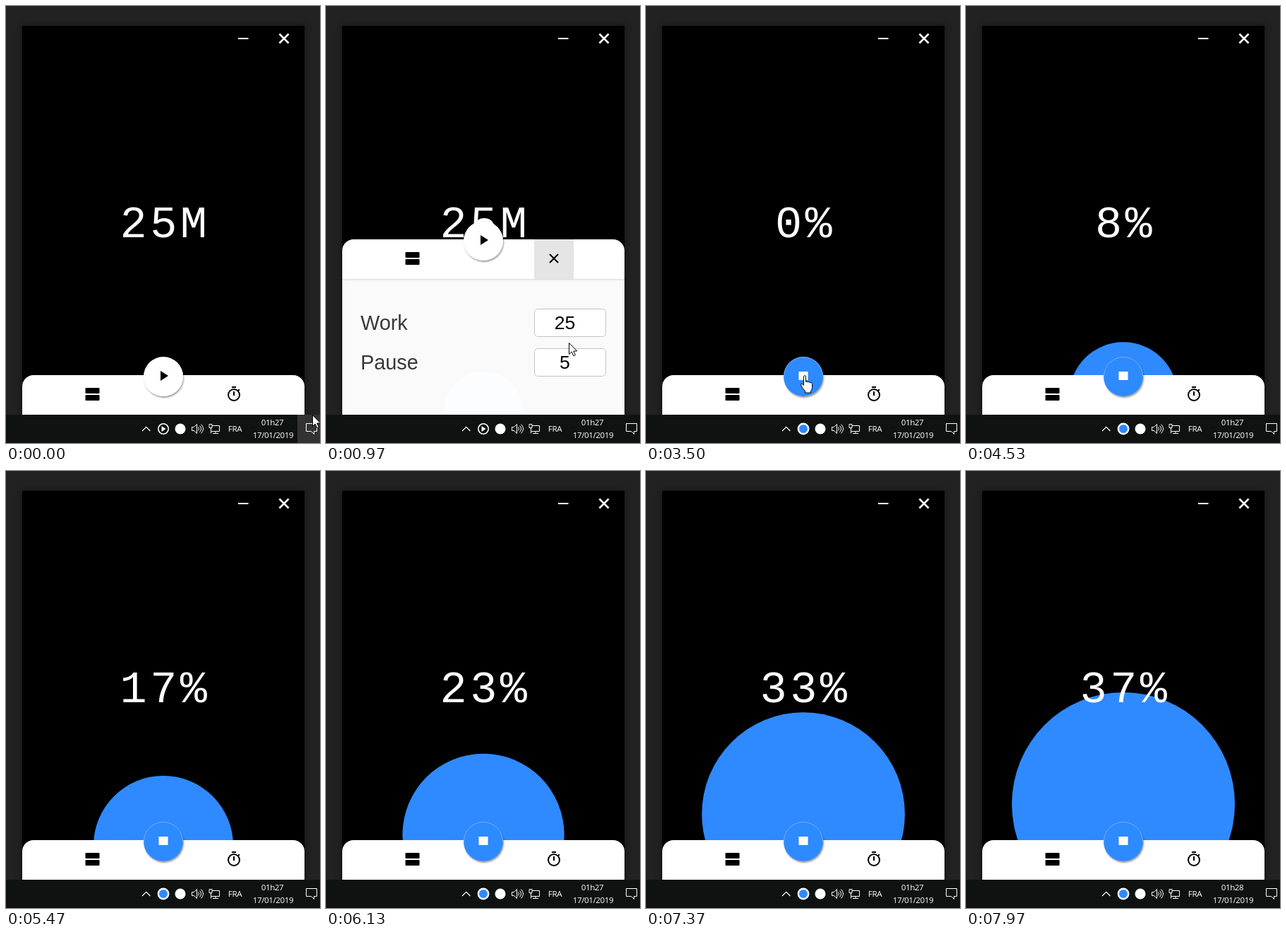
Write an HTML page that moves like this. It is 445x618 px and loops after 8 s.

```html
<!DOCTYPE html>
<html lang="en">
<head>
<meta charset="utf-8">
<title>Work timer</title>
<style>
  html, body { margin: 0; width: 100%; height: 100%; overflow: hidden; background: #222; }
  svg { display: block; width: 445px; height: 618px; }
  text { text-anchor: middle; }
  .time { font: 63.500px "Liberation Mono", monospace; letter-spacing: 4.500px; fill: #fff; }
  .label { font: 28.800px "Liberation Sans", sans-serif; fill: #383838; text-anchor: start; }
  .value { font: 26.600px "Liberation Sans", sans-serif; fill: #000; }
  .tray { font: 500 11.500px "Open Sans", sans-serif; letter-spacing: -.350px; fill: #fff; }
  .field { fill: #fff; stroke: #c4c4c4; }
  .line { fill: none; stroke: #fff; }
</style>
</head>
<body>
<svg viewBox="0 0 445 618">
  <defs>
    <clipPath id="frame"><rect x="23" y="28" width="400" height="550"/></clipPath>
    <filter id="glow" x="-10%" y="-10%" width="120%" height="120%"><feGaussianBlur stdDeviation="5"/></filter>
    <filter id="lift" x="-20%" y="-20%" width="150%" height="150%">
      <feDropShadow dx="1" dy="2" stdDeviation="1" flood-color="#000" flood-opacity=".4"/>
    </filter>
    <linearGradient id="edge" x2="0" y2="1">
      <stop stop-color="#000" stop-opacity=".12"/><stop offset="1" stop-color="#000" stop-opacity="0"/>
    </linearGradient>
  </defs>

  <rect width="445" height="618" fill="#222"/>
  <rect x="22" y="28" width="402" height="552" opacity=".4" filter="url(#glow)"/>

  <g clip-path="url(#frame)">
    <rect x="23" y="28" width="400" height="550"/>
    <path class="line" stroke-width="2" d="M329 46h14.500"/>
    <path class="line" stroke-width="2.500" d="M387.500 39.500l13 13m0-13l-13 13"/>
    <circle id="progress" cx="223" fill="#2f8aff"/>
    <text id="time" class="time" x="225.500" y="327"></text>

    <g id="panel">
      <rect x="23" y="55" width="400" height="251" fill="#fff" opacity=".98"/>
      <rect x="23" y="56" width="400" height="3" fill="url(#edge)"/>
      <path d="M23 56V16a16 16 0 0 1 16-16H407a16 16 0 0 1 16 16V56z" fill="#fff"/>
      <rect id="hover" x="295" width="56" height="56" fill="#e5e5e5"/>
      <rect x="112.500" y="18" width="20" height="8" rx="1"/>
      <rect x="112.500" y="28" width="20" height="8" rx="1"/>
      <g id="watch" transform="translate(311 15)" fill="none" stroke="#000" stroke-width="2">
        <circle cx="12" cy="13" r="8"/>
        <path d="M9 2h6M12 8v6M17.700 7.300l2.100-2.100"/>
      </g>
      <path id="close" d="M317 21l12 12m0-12l-12 12" stroke="#000" stroke-width="2"/>
      <text class="label" x="49" y="128">Work</text>
      <text class="label" x="49" y="184">Pause</text>
      <rect class="field" x="295.500" y="98.500" width="101" height="39" rx="5"/>
      <rect class="field" x="295.500" y="154.500" width="101" height="39" rx="5"/>
      <text id="work" class="value" x="338.500" y="127"></text>
      <text id="pause" class="value" x="338.500" y="183"></text>
      <circle id="fab" cx="223" cy="2" r="28" filter="url(#lift)"/>
      <path id="rim" d="M195.500 2a27.500 27.500 0 0 1 55 0" fill="none" stroke="#8fb6ea" stroke-width=".8"/>
      <path id="play" d="M219-6v14l11-7z"/>
      <rect id="stop" x="216.500" y="-5" width="13" height="12" fill="#fff"/>
    </g>
  </g>

  <rect y="578" width="445" height="40" fill="#101111"/>
  <rect id="tile" x="413" y="578" width="32" height="40" fill="#333"/>
  <path class="line" stroke-width="1.200" d="M193 601l5.700-5.700 5.700 5.700"/>
  <circle id="trayRing" cx="223" cy="598" r="7.200" stroke="#fff"/>
  <path id="trayPlay" d="M220.500 594v8l6-4z" fill="#fff"/>
  <circle cx="247" cy="598" r="7.500" fill="#fff"/>
  <path class="line" d="M263.500 595.500h3l4-4v13l-4-4h-3zM272.500 595.500q2 2.500 0 5M274.500 593.500q4 4.500 0 9M276.500 591.500q6 6.500 0 13"/>
  <path class="line" d="M292 593.500h10.500v8H290M288 591.500h4v5h-4zM290.500 596.500v8M293 604.500h8M297 601.500v3"/>
  <text class="tray" x="324.500" y="602">FRA</text>
  <text id="clock" class="tray" x="377.500" y="593"></text>
  <text class="tray" x="378.500" y="611">17/01/2019</text>
  <path class="line" d="M425.500 590.500h15v11h-4v4l-4-4h-7z"/>

  <g id="cursor" fill="#fff" stroke="#000">
    <path id="arrow" d="M.500.500v16l3.700-3.500 2.600 5.800 2.500-1.100-2.500-5.700h4.900z"/>
    <path id="hand" d="M-1.500 1.500q1.500-2 3 0v8q1.500-1.500 3 .5 1.500-1.200 3 .5 3-.8 3 2v5q0 3-2 5v2.500H.500v-2.500q-4-4-6-8.500 0-2.500 2-1.500l2 2z"/>
  </g>
</svg>

<script>
const LOOP = 8000;
const OPEN = 400, CLOSE = 2695, SLIDE = 500, RUN = 3430;
const BLUE = '#2f8aff';
const el = {};
document.querySelectorAll('[id]').forEach(node => el[node.id] = node);

// [time, x, y]
const cursorPath = [
  [30, 434, 578], [300, 325, 548], [520, 325, 546], [970, 344, 476], [1100, 346, 452],
  [1450, 346, 452], [1650, 346, 499], [2050, 346, 499], [2380, 334, 371],
  [2530, 334, 371], [2600, 332, 367], [2800, 332, 367], [3230, 225, 522],
  [3530, 225, 522], [4180, -20, 470]
];
// [time, percent]
const percentPath = [[3500, 0], [4530, 8.3], [5470, 17], [6770, 28.2], [7970, 37]];

const clamp = v => Math.min(1, Math.max(0, v));
const show = (node, on) => node.setAttribute('visibility', on ? 'visible' : 'hidden');
const move = (node, x, y) => node.setAttribute('transform', `translate(${x} ${y})`);
const put = (node, text) => { if (node.textContent !== text) node.textContent = text; };
const smooth = v => v * v * (3 - 2 * v);

// cubic-bezier(.4, 0, .2, 1)
function standard(x) {
  let lo = 0, hi = 1;
  for (let i = 0; i < 20; i++) {
    const u = (lo + hi) / 2, w = 1 - u;
    if (1.2 * u * w * w + 0.6 * u * u * w + u ** 3 < x) lo = u; else hi = u;
  }
  return smooth(lo);
}

function along(path, t, ease = v => v) {
  const next = path.findIndex(p => p[0] > t);
  if (next === 0) return path[0].slice(1);
  if (next < 0) return path[path.length - 1].slice(1);
  const a = path[next - 1], b = path[next];
  const k = ease((t - a[0]) / (b[0] - a[0]));
  return a.slice(1).map((v, i) => v + (b[i + 1] - v) * k);
}

function render(t) {
  const running = t >= RUN;
  const open = standard(clamp((t - OPEN) / SLIDE)) - standard(clamp((t - CLOSE) / SLIDE));
  move(el.panel, 0, 522 - 192 * open);

  const radius = Math.max(56, 99 + 0.0236 * (t - 5470));
  el.progress.setAttribute('r', radius);
  el.progress.setAttribute('cy', 629 - radius);

  const work = t < 1400 ? '25' : '2';
  put(el.work, work);
  put(el.pause, t < 1900 ? '5' : '1');
  put(el.time, running ? Math.round(along(percentPath, t)[0]) + '%' : work + 'M');
  put(el.clock, t < 7750 ? '01h27' : '01h28');

  const settings = t >= OPEN && t < CLOSE;
  show(el.close, settings);
  show(el.watch, !settings);
  show(el.hover, t >= 250 && t < 2890);
  show(el.tile, t < 60);

  el.fab.setAttribute('fill', running ? BLUE : '#fff');
  show(el.rim, running);
  show(el.play, !running);
  show(el.stop, running);
  el.trayRing.setAttribute('fill', running ? BLUE : 'none');
  el.trayRing.setAttribute('stroke-width', running ? 2.4 : 1.6);
  show(el.trayPlay, !running);

  const [x, y] = along(cursorPath, t, smooth);
  move(el.cursor, x, y);
  const hand = (t > 250 && t < 560) || (t > 2360 && t < 2890) || (t > 3150 && t < 3650);
  show(el.hand, hand);
  show(el.arrow, !hand);
}

const start = performance.now();
function tick() {
  render((performance.now() - start) % LOOP);
  requestAnimationFrame(tick);
}
tick();
</script>
</body>
</html>
```
